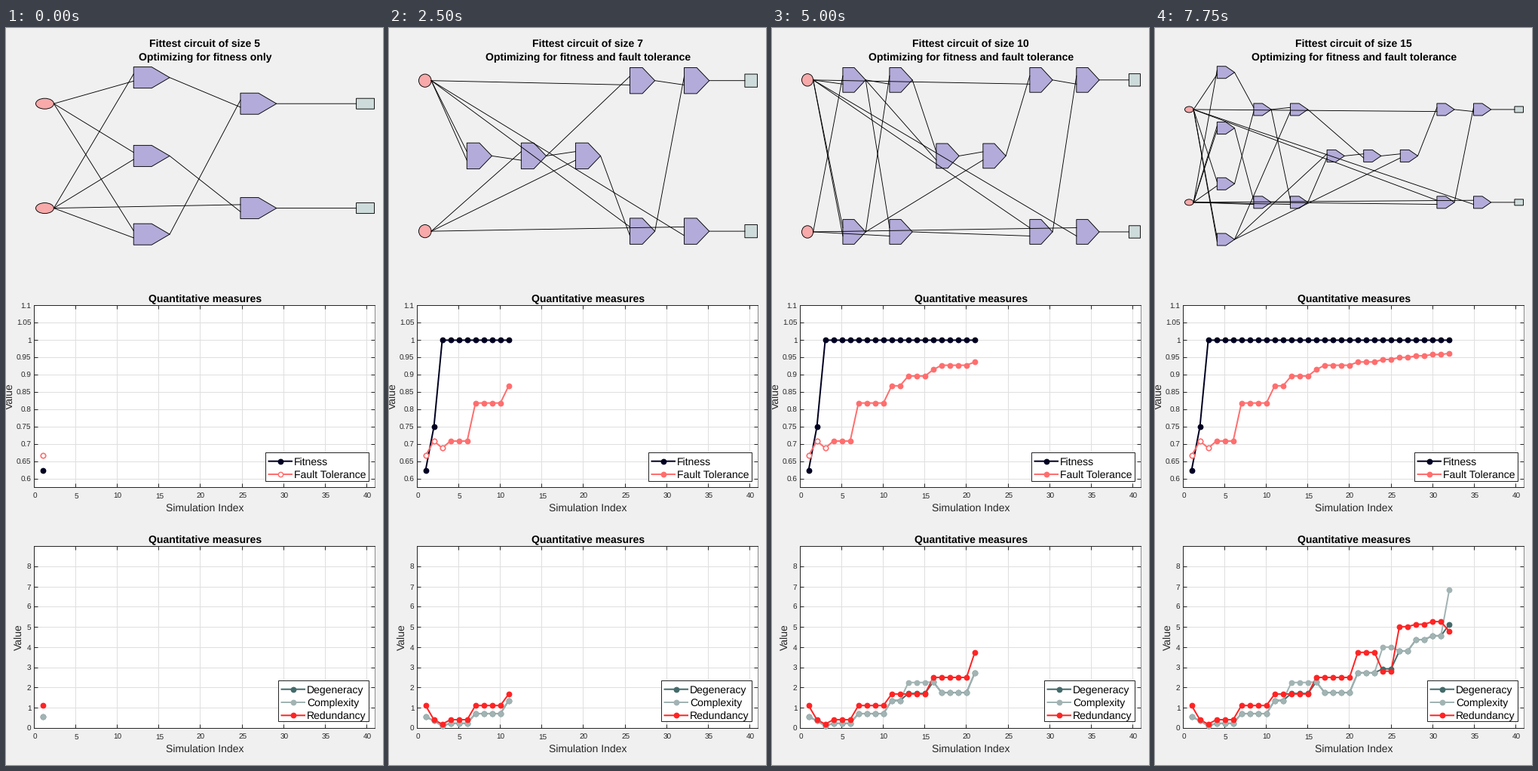
These frames come from a looping animation (500 px wide and 976 px high, 8000 ms). A matplotlib script:

```python
import numpy as np
import matplotlib.pyplot as plt
from matplotlib.animation import FuncAnimation
from matplotlib.patches import Ellipse, Polygon, Rectangle

W, H, DPI = 500, 976, 100
PX = 72 / DPI                      # points per pixel
MID_X, MID_Y = 264, 169.4          # centre of the circuit drawing
LEFT, RIGHT = 37.5, 489.5          # plot edges
INK = "#262626"
NAVY, PINK = "#000022", "#ff6e6e"
TEAL, GREY, RED = "#446a6a", "#a2b3b3", "#ff2424"

plt.rcParams["font.family"] = "Liberation Sans"
plt.rcParams["text.hinting"] = "none"
fig = plt.figure(figsize=(W / DPI, H / DPI), dpi=DPI, facecolor="#f0f0f0")
ax = fig.add_axes([0, 0, 1, 1])
ax.set_xlim(0, W)
ax.set_ylim(H, 0)
ax.axis("off")


def text(x, y, s, size=14, ha="center", **kw):
    kw.setdefault("color", INK)
    return ax.text(x, y, s, fontsize=size * PX, ha=ha, va="baseline", **kw)


def line(xs, ys, color=INK, width=1, z=2):
    return ax.plot(xs, ys, color=color, lw=width * PX, zorder=z, snap=False)[0]


def dots(xs, ys, color, face, z):
    return ax.plot(xs, ys, "o", ms=6.3 * PX, mew=1.5 * PX, mec=color,
                   mfc=face, zorder=z)[0]


def patch(shape):
    shape.set_snap(False)
    return ax.add_patch(shape)


def crisp(v):
    """Centre of the pixel that holds v."""
    return np.floor(v) + 0.5


# ---- circuits ----------------------------------------------------------
# Inputs are x and y. Gates p, q feed the output gates s, t; the others
# form the body. Each gate maps to its upper and lower source.
gates = {}
stages = []


def evolve(runs, **changes):
    """Add or rewire gates and keep the circuit for some runs."""
    gates.update(changes)
    stages.append((runs, dict(sorted(gates.items()))))


evolve(1, h="yx", p="xy", q="xy", s="qh", t="yp")
evolve(1, t="yx")
evolve(1, h="xy", p="hx", s="qp")
evolve(3, h="yy")
evolve(4, h="yx", k="hy", q="xk")
evolve(2, d="xx", h="yd")
evolve(3, e="yd", h="ed")
evolve(1, a="yx", e="da")
evolve(4, h="ea")
evolve(3, i="hd", k="ay", p="ix")
evolve(2, h="ed", i="ha", j="id", p="jx")
evolve(2, g="ye", h="gd")
evolve(2, b="yy", k="by")
evolve(2, f="ed", g="ey", h="dg", i="hf")
evolve(1, c="xy", e="ac")

holds = [runs for runs, _ in stages]
N = sum(holds)
stage_at = np.repeat(np.arange(len(stages)), holds)


def columns_of(net):
    """Body gates sit right after their sources, the last pairs at the end."""
    col = {"x": 0, "y": 0}

    def place(g):
        if g not in col:
            col[g] = 1 + max(place(src) for src in net[g])
        return col[g]

    for g in net:
        place(g)
    col["p"] = col["q"] = max(col["p"], col["q"])
    col["s"] = col["t"] = col["p"] + 1
    col["X"] = col["Y"] = col["p"] + 2
    return col


def layout(net):
    """Node centres and gate size."""
    col = columns_of(net)
    count = col["X"] + 1
    rows = [sorted(g for g in col if col[g] == c) for c in range(count)]
    most = max(map(len, rows))

    ratio = np.sqrt((count + 1) / (most + 1))
    scale = 0.242 + 0.02 * most
    fx, fy = scale * ratio, scale / ratio      # gate size in grid steps
    dx = 449 / (count - 1 + fx / 2)
    dy = (230.5 + 1.7 * most) / (most - 1 + fy)
    at = {}
    for c, names in enumerate(rows):
        step = dy * (most + 1) / (len(names) + 1)
        for r, g in enumerate(names):
            at[g] = (MID_X + dx * (c - (count - 1) / 2),
                     MID_Y + step * (r - (len(names) - 1) / 2))
    return at, fx * dx, fy * dy


def draw_circuit(net):
    at, w, h = layout(net)
    style = dict(ec="black", lw=0.9 * PX, zorder=3)
    out = []

    def wire(src, x, y):
        sx, sy = at[src]
        sx += w / 4 if src in "xy" else w / 2
        out.append(line([sx, x], [sy, y], "black", 0.9, 4))

    for g in "xy":
        out.append(patch(Ellipse(at[g], w / 2, h / 2, fc="#f8a9a9", **style)))
    for g, (a, b) in net.items():
        x, y = at[g]
        l, r, top, low = x - w / 2, x + w / 2, y - h / 2, y + h / 2
        shape = [(l, top), (x, top), (r, y), (x, low), (l, low)]
        out.append(patch(Polygon(shape, fc="#b3abd9", **style)))
        wire(a, l, y - h / 6)
        wire(b, l, y + h / 6)
    for g, src in ("X", "s"), ("Y", "t"):
        x, y = at[g]
        out.append(patch(Rectangle((x - w / 4, y - h / 4), w / 2, h / 2,
                                   fc="#cddbda", **style)))
        wire(src, x - w / 4, y)
    return out


# ---- measures ----------------------------------------------------------
def levels(*values):
    return np.repeat(values, holds)


OPEN = 3                           # runs optimised for fitness only
gain = np.arange(len(stages) - OPEN)
fitness = np.minimum(1, np.arange(5, 5 + N) / 8 + (np.arange(N) > 1))
fault = levels(0.667, 0.709, 0.689, *(1 - 0.291 / (1 + 0.605 * gain)))
complexity = levels(0.58, 0.38, 0.12, 0.25, 0.73, 1.38, 2.27, 2.30,
                    1.77, 2.75, 4.02, 3.83, 4.39, 4.58, 6.85)
redundancy = levels(1.13, 0.43, 0.21, 0.43, 1.13, 1.70, 1.70, 2.52,
                    2.52, 3.76, 2.83, 5.03, 5.15, 5.28, 4.80)
degeneracy = np.minimum(complexity,
                        redundancy + 0.08 * (complexity - redundancy) ** 2)


def px(i):
    return LEFT + (RIGHT - LEFT) * np.asarray(i) / 41


class Plot:
    def __init__(self, top, bottom, lo, hi, ticks, label_x):
        self.top, self.bottom, self.lo, self.hi = top, bottom, lo, hi
        patch(Rectangle((LEFT, top), RIGHT - LEFT, bottom - top,
                        fc="white", ec="none", zorder=0))
        for v in range(0, 41, 5):
            x = crisp(px(v))
            line([x, x], [top, bottom], "#dfdfdf", z=1)
            line([x, x], [bottom, bottom - 4.5])
            line([x, x], [top, top + 4.5])
            text(px(v) + 0.5, bottom + 14.5, str(v), 10)
        for v in ticks:
            y = crisp(self.py(v))
            line([LEFT, RIGHT], [y, y], "#dfdfdf", z=1)
            line([LEFT, LEFT + 4.5], [y, y])
            line([RIGHT, RIGHT - 4.5], [y, y])
            text(33.5, y + 3.7, f"{v:g}", 10, "right")
        line([RIGHT, RIGHT], [top, bottom], "#8c8c8c")
        line([RIGHT, LEFT, LEFT, RIGHT], [top, top, bottom, bottom])
        text(264, top - 5.5, "Quantitative measures", weight="bold", color="black")
        text(264, bottom + 31.5, "Simulation Index")
        text(label_x, (top + bottom) / 2, "Value", rotation=90,
             rotation_mode="anchor")

    def py(self, v):
        part = (np.asarray(v) - self.lo) / (self.hi - self.lo)
        return self.bottom - (self.bottom - self.top) * part

    def series(self, values, color):
        path = line([], [], color, 2, 5)
        return self, path, dots([], [], color, color, 6), values

    def legend(self, x, y, h, entries):
        patch(Rectangle((x, y), 481.5 - x, h, fc="white", ec=INK,
                        lw=PX, zorder=8))
        marks = []
        for k, (name, color) in enumerate(entries):
            cy = y + 11.2 + 17.3 * k
            line([x + 4, x + 34.5], [cy, cy], color, 2, 9)
            marks.append(dots([x + 19], [cy], color, color, 10))
            text(x + 37.5, cy + 5.2, name, ha="left", color="black", zorder=10)
        return marks


upper = Plot(367.5, 608.5, 0.575, 1.1, np.arange(12, 23) / 20, 8.5)
lower = Plot(686.5, 927.5, 0, 9, range(9), 21)
tracks = [upper.series(fitness, NAVY), upper.series(fault, PINK),
          lower.series(degeneracy, TEAL), lower.series(complexity, GREY),
          lower.series(redundancy, RED)]
hollow = dots([], [], PINK, "white", 7)
fault_key = upper.legend(344.5, 562.5, 38,
                         [("Fitness", NAVY), ("Fault Tolerance", PINK)])[1]
lower.legend(361.5, 864.5, 54, [("Degeneracy", TEAL), ("Complexity", GREY),
                                ("Redundancy", RED)])
size_title = text(263.5, 25, "", weight="bold", color="black")
goal_title = text(264, 43, "", weight="bold", color="black")
circuit = []


def update(i):
    while circuit:
        circuit.pop().remove()
    net = stages[stage_at[i]][1]
    circuit.extend(draw_circuit(net))

    early = i < OPEN
    size_title.set_text(f"Fittest circuit of size {len(net)}")
    goal_title.set_text("Optimizing for fitness "
                        + ("only" if early else "and fault tolerance"))

    xs = px(np.arange(1, i + 2))
    for plot, path, marks, values in tracks:
        ys = plot.py(values[:i + 1])
        path.set_data(xs, ys)
        marks.set_data(xs, ys)
    hollow.set_data(xs[:OPEN], upper.py(fault[:i + 1][:OPEN]))
    fault_key.set_markerfacecolor("white" if early else PINK)
    return []


anim = FuncAnimation(fig, update, frames=N, interval=250, repeat=True,
                     repeat_delay=0, init_func=lambda: update(0), blit=False)
plt.show()
```
